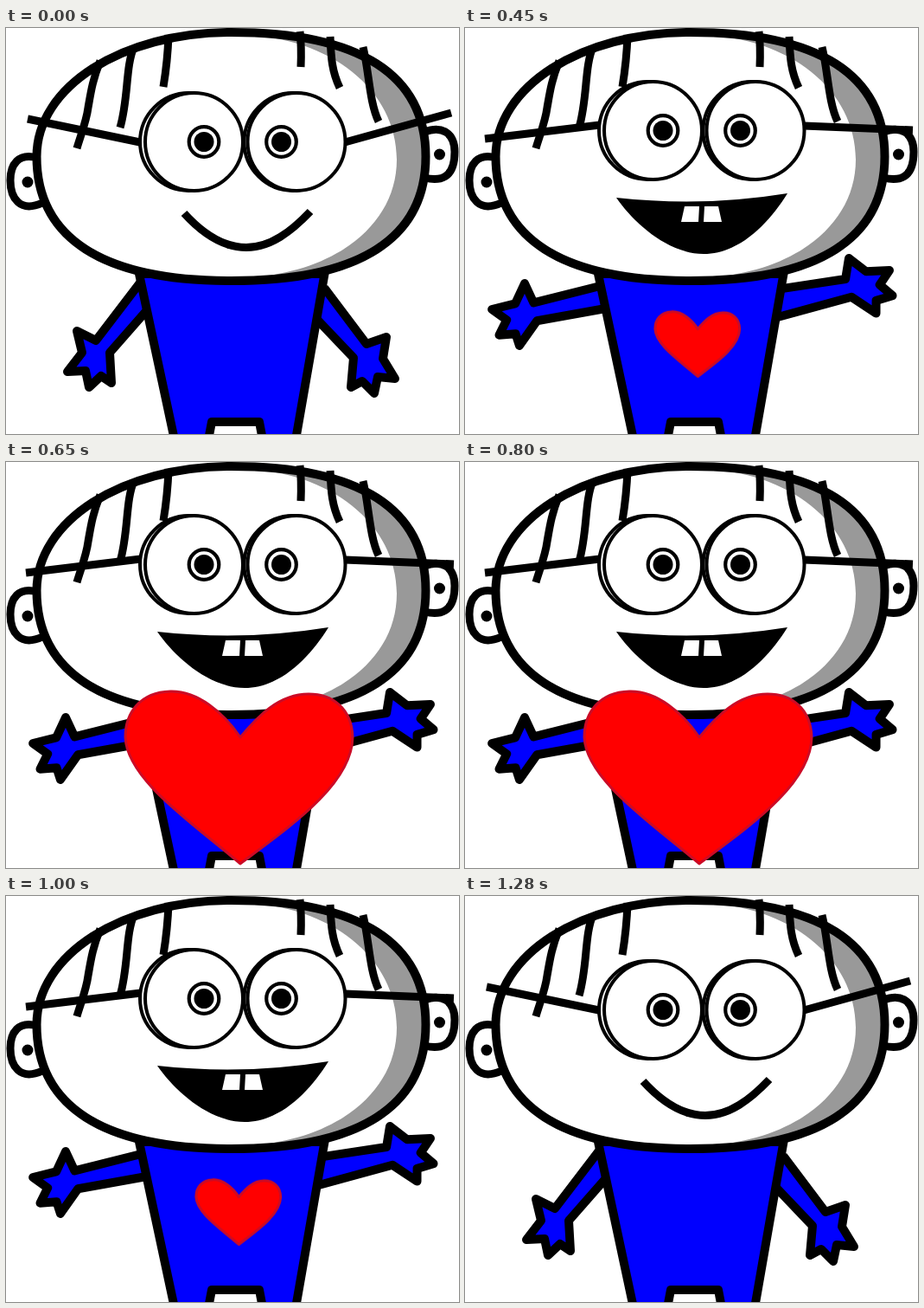
Recreate the animation shown at these times as an HTML page. Size 524x469 px, loop 1400 ms.

```html
<!DOCTYPE html>
<html lang="en">
<head>
<meta charset="utf-8">
<title>Big heart</title>
<style>
html, body { margin: 0; width: 100%; height: 100%; overflow: hidden; background: #fff; }
svg { display: block; width: 524px; height: 469px; }
.line { fill: none; stroke: #000; stroke-width: 9; }
.limb { fill: #00f; stroke: #000; stroke-width: 10; stroke-linejoin: round; }
.lens { fill: #fff; stroke: #000; stroke-width: 4; }
.calm { animation: calm 1400ms step-end infinite; }
.glad { animation: glad 1400ms step-end infinite; }
.heart {
  fill: #f00; stroke: #cb0b26; stroke-width: 3; stroke-linejoin: round;
  vector-effect: non-scaling-stroke;
  transform-origin: 0 0;
  animation: beat 1400ms step-end infinite;
}
@keyframes calm {
  0%, 78.5714% { visibility: visible; }
  32.1428% { visibility: hidden; }
}
@keyframes glad {
  0%, 78.5714% { visibility: hidden; }
  32.1428% { visibility: visible; }
}
@keyframes beat {
  0%, 78.5714% { visibility: hidden; transform: translate(168.5px, 228px) scale(.372, .376); }
  32.1428%, 71.4285% { visibility: visible; transform: translate(168.5px, 228px) scale(.372, .376); }
  39.2857%, 64.2857% { visibility: visible; transform: translate(93.6px, 124.5px) scale(.65, .658); }
  46.4285% { visibility: visible; transform: none; }
}
</style>
</head>
<body>
<svg viewBox="0 0 524 469">
  <defs>
    <path id="armL" d="M156 293L104 361 82 350 88 375 71 397 92 396 96 415 110 402 122 410 120 375 178 309"/>
    <path id="armR" d="M368 300L417 365 440 357 436 382 450 405 430 403 426 422 412 408 399 415 402 381 341 317"/>
    <path id="head" d="M35.500 148.500C35.500 68 134 5 260.500 5C409 5 485.500 54 485.500 148.500C485.500 243 409 292 260.500 292C112 292 35.500 243 35.500 148.500Z"/>
    <clipPath id="skull"><use href="#head"/></clipPath>
    <g id="eye">
      <circle r="17.300" fill="#fff" stroke="#000" stroke-width="4.200"/>
      <circle r="11.500"/>
    </g>
    <g id="lenses">
      <circle class="lens" cx="211.500" cy="131.500" r="56.500"/>
      <circle class="lens" cx="217.500" cy="131.500" r="56.500"/>
      <circle class="lens" cx="332" cy="131.500" r="56.500"/>
      <circle class="lens" cx="336" cy="131.500" r="56.500"/>
      <use href="#eye" x="229" y="131.500"/>
      <use href="#eye" x="318.500" y="131.500"/>
    </g>
  </defs>

  <!-- arms -->
  <g class="limb calm">
    <use href="#armL"/>
    <use href="#armR"/>
  </g>
  <g class="limb glad">
    <use href="#armL" transform="translate(222.7 -29.9) rotate(38.5)"/>
    <use href="#armR" transform="translate(-79.3 483.2) rotate(-61.6)"/>
  </g>

  <!-- body -->
  <path class="limb" d="M154 284L195 476H234L238 455H293L297 476H335L368.500 284Z"/>

  <!-- ears and head -->
  <g class="line">
    <path d="M36 150C14 144 5 158 5 176C5 196 16 214 42 202"/>
    <path d="M484 120C505 112 519 122 519 143C519 168 508 179 484 173"/>
  </g>
  <circle cx="25" cy="178" r="6.500"/>
  <circle cx="501.500" cy="146" r="6.500"/>
  <use href="#head" fill="#fff"/>
  <path clip-path="url(#skull)" fill="#999" d="M272 8C375 10 452 72 452 152C452 225 385 280 285 288V300H500V0H272Z"/>
  <use href="#head" class="line" style="stroke-width:10"/>

  <!-- hair -->
  <g class="line">
    <path d="M109 38C100 60 98 75 95 92C93 108 86 125 82 139"/>
    <path d="M148 22C138 45 142 80 132 115"/>
    <path d="M188 8Q187 38 182 68"/>
    <path d="M340 4Q342 22 341 45"/>
    <path d="M375 10C376 35 377 50 386 69"/>
    <path d="M413 22C420 50 420 85 431 108"/>
  </g>

  <!-- faces -->
  <g class="calm">
    <path class="line" d="M25 105L155 132M392 132L515 98"/>
    <use href="#lenses"/>
    <path class="line" d="M206 214C226 236 250 253.500 278 253.500C306 253.500 330 235 352 212"/>
  </g>
  <g class="glad">
    <path class="line" d="M23 128L156 112M392 113L518 118"/>
    <use href="#lenses" y="-13"/>
    <path d="M175 196Q275 207 373 191C352 225 318 261 276 261C235 261 195 225 175 196Z"/>
    <path fill="#fff" d="M254 206H271L270 224H250ZM277 206H293L297 224H276Z"/>
  </g>

  <path class="heart" d="M271 318C252 290 222 264 190 265C155 266 138 290 138 318C140 366 212 414 271 464C330 420 400 372 401 318C400 285 378 268 350 268C315 268 290 295 271 318Z"/>
</svg>
</body>
</html>
```
